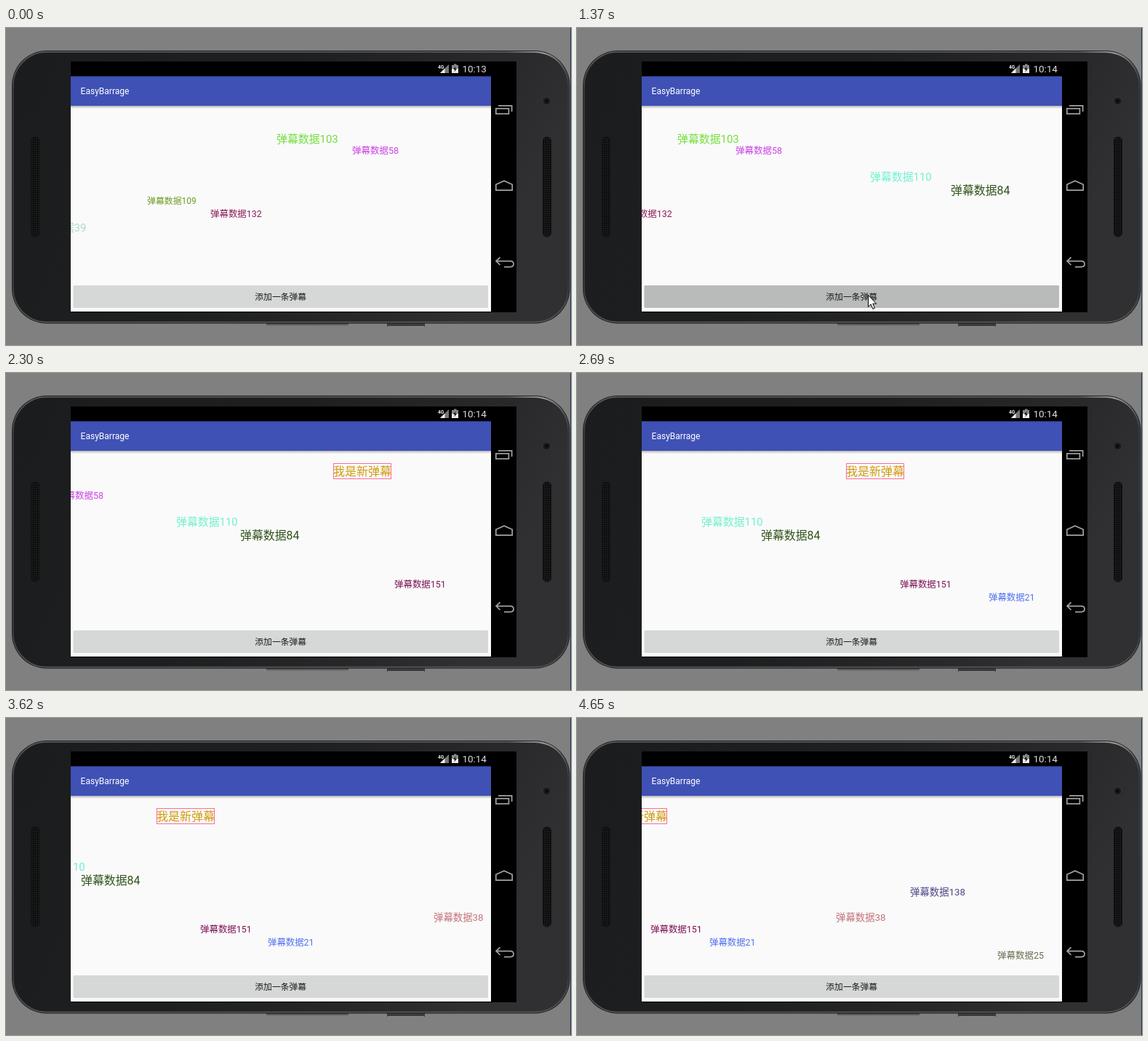
These frames come from a looping animation (777 by 436 pixels, 4750 ms). An HTML page:

```html
<!DOCTYPE html>
<html lang="zh-CN">
<head>
<meta charset="utf-8">
<title>EasyBarrage</title>
<style>
  html, body { margin: 0; width: 100%; height: 100%; overflow: hidden; background: #808080; }
  svg { display: block; width: 777px; height: 436px; }
  text { font-family: Roboto, "Noto Sans CJK SC", "Noto Sans CJK", sans-serif; white-space: pre; }
</style>
</head>
<body>
<svg viewBox="0 0 777 436">
  <defs>
    <linearGradient id="body" x1="0" y1="0" x2="1" y2="0.25">
      <stop offset="0" stop-color="#1b1c1d"/>
      <stop offset="0.5" stop-color="#1e1f20"/>
      <stop offset="0.85" stop-color="#29292b"/>
      <stop offset="1" stop-color="#303032"/>
    </linearGradient>
    <linearGradient id="rim" x1="0" y1="0" x2="0" y2="1">
      <stop offset="0" stop-color="#5e5f60"/>
      <stop offset="0.15" stop-color="#3a3b3c"/>
      <stop offset="0.85" stop-color="#38393a"/>
      <stop offset="1" stop-color="#5a5a5b"/>
    </linearGradient>
    <linearGradient id="gloss" x1="0" y1="0" x2="1" y2="0">
      <stop offset="0" stop-color="#bbb" stop-opacity="0"/>
      <stop offset="0.6" stop-color="#bbb" stop-opacity="0.7"/>
      <stop offset="1" stop-color="#bbb" stop-opacity="0"/>
    </linearGradient>
    <linearGradient id="shade" x1="0" y1="0" x2="0" y2="1">
      <stop offset="0" stop-color="#000" stop-opacity="0.28"/>
      <stop offset="1" stop-color="#000" stop-opacity="0"/>
    </linearGradient>
    <pattern id="mesh" width="3" height="3" patternUnits="userSpaceOnUse">
      <rect width="3" height="3" fill="#1e1f20"/>
      <circle cx="1.5" cy="1.5" r="1.2" fill="#080808"/>
    </pattern>
    <clipPath id="screen"><rect x="89" y="107" width="578" height="247"/></clipPath>
  </defs>

  <rect width="777" height="436" fill="#808080"/>

  <!-- phone -->
  <rect x="358" y="405" width="113" height="5" rx="1" fill="#4a4a4a"/>
  <path d="M358 409H471" stroke="#9a9a9a"/>
  <rect x="524" y="405" width="52" height="6" rx="1" fill="#3c3c3c"/>
  <path d="M525 410.5H575" stroke="#8c8c8c"/>
  <rect x="8" y="31" width="767.5" height="375.5" rx="48" fill="#232425"/>
  <rect x="10" y="33" width="763.5" height="371.5" rx="46" fill="url(#body)" stroke="url(#rim)" stroke-width="1.6"/>
  <path d="M690 33H727Q764 35 772 70" fill="none" stroke="url(#gloss)" stroke-width="2"/>
  <g fill="url(#mesh)" stroke="#111">
    <rect x="34.5" y="150" width="11" height="137" rx="5"/>
    <rect x="738.5" y="150" width="11" height="137" rx="5"/>
  </g>
  <circle cx="743.5" cy="100.5" r="5.5" fill="#1b1b1d" stroke="#39393c"/>
  <circle cx="743.5" cy="100.5" r="2.2" fill="#0a0a0d"/>
  <rect x="776" width="1" height="436" fill="#1f3c5c"/>

  <!-- display -->
  <rect x="89" y="46" width="613" height="345" fill="#000"/>
  <rect x="89" y="67" width="578" height="323" fill="#fafafa"/>
  <rect x="89" y="66.4" width="578" height="40.6" fill="#3f51b5"/>
  <rect x="89" y="107" width="578" height="4" fill="url(#shade)"/>
  <text x="102.6" y="91.3" font-size="12" fill="#fff">EasyBarrage</text>

  <!-- status bar -->
  <path d="M609 50V62H597Z" fill="#777"/>
  <path d="M603.5 55.5V62H597Z" fill="#eee"/>
  <text x="594" y="55.5" font-size="6.6" font-weight="700" fill="#eee">4G</text>
  <path d="M613 51H616V49.5H619.5V51H622V62H613Z" fill="#868686"/>
  <path d="M613 56H622V62H613Z" fill="#eee"/>
  <path d="M618.5 52.5L615 57H617.2L616.5 60.5L620 56H617.8Z" fill="#111"/>
  <text id="clock" x="627.4" y="61.3" font-size="13.4" fill="#dcdcdc"></text>

  <!-- navigation -->
  <g fill="none" stroke="#a2a2a2" stroke-width="1.7">
    <rect x="673.8" y="110.8" width="17.6" height="7.2"/>
    <path d="M677 106.9H695.6V115"/>
    <path d="M673.8 223.2V215.3L685 210.3L696.2 215.3V223.2Z"/>
    <path d="M679.5 315.3L674 320.6L679.5 326M674 320.6H693.5Q698 320.6 698 324.6T693.5 328.6H685"/>
  </g>

  <!-- button -->
  <rect x="92.5" y="354" width="570.5" height="31" rx="1.5" fill="#d6d7d7"/>
  <rect id="press" x="92.5" y="354" width="570.5" height="31" rx="1.5" fill="#b9bbba"/>
  <text x="377.7" y="374.2" font-size="11.8" text-anchor="middle" fill="#1d1d1d">添加一条弹幕</text>

  <g id="lane" clip-path="url(#screen)"></g>
  <path id="cursor" d="M0.5 0.5V16.5L4.2 13L6.8 19.4L9.4 18.3L6.8 12.2H11.6Z" fill="#fff" stroke="#000"/>
</svg>
<script>
const LOOP = 4750;
const TICKS = [0, 150, 270, 390, 550, 670, 820, 980, 1130, 1250, 1370, 1490, 1610,
  1770, 1910, 2060, 2180, 2300, 2450, 2570, 2690, 2810, 2930, 3080, 3200, 3350, 3470,
  3620, 3750, 3900, 4020, 4140, 4260, 4380, 4500, 4650];
const LEFT = 89, SPAN = 578, OMEGA = 2.708e-4;

// label, size, colour, middle y, known x at known time
const items = [
  ['弹幕数据103', 14.9, '#74de3c', 152.5, 371.6, 0],
  ['弹幕数据58', 12.5, '#cc40e6', 168.2, 476, 0],
  ['弹幕数据109', 11.9, '#6b9c22', 237.7, 194, 0],
  ['弹幕数据132', 12.45, '#8c1a58', 256, 280.8, 0],
  ['弹幕数据39', 14.9, '#a9dbc8', 275, 34, 0],
  ['弹幕数据110', 14.9, '#72f0d0', 205, 234, 2300],
  ['弹幕数据84', 15.9, '#30531a', 223, 321.5, 2300],
  ['我是新弹幕', 16, '#d2990f', 135.5, 277, 3200],
  ['弹幕数据151', 12.45, '#7d1254', 291, 342.2, 3200],
  ['弹幕数据21', 12.4, '#5070f0', 308.3, 266, 4140],
  ['弹幕数据38', 13.4, '#c0737a', 274, 356.3, 4650],
  ['弹幕数据138', 13.4, '#4c4784', 239, 457.8, 4650],
  ['弹幕数据25', 12.5, '#6c6c54', 326, 578.3, 4650]
].map(([label, size, color, y, x, t]) => ({
  label, size, color, y, phase: Math.atan((x - LEFT) / SPAN) + OMEGA * t
}));

const $ = id => document.getElementById(id);
const clamp = v => Math.max(0, Math.min(1, v));

function add(parent, tag, attrs) {
  const el = document.createElementNS('http://www.w3.org/2000/svg', tag);
  for (const key in attrs) el.setAttribute(key, attrs[key]);
  return parent.appendChild(el);
}

for (const it of items) {
  it.el = add($('lane'), 'g', {});
  if (it.label.startsWith('我')) {
    add(it.el, 'rect', { x: 0.5, y: 124.5, width: 79, height: 21, fill: 'none', stroke: '#ff6a9c' });
  }
  add(it.el, 'text', {
    x: 0, y: it.y + it.size * 0.36, 'font-size': it.size, fill: it.color
  }).textContent = it.label;
}

function cursorAt(t) {
  if (t < 390 || t >= 2060) return null;
  if (t >= 1910) return [430, 366];
  const k = 1 - clamp((t - 390) / 280);
  return [400 + 6 * k, 367 + 55 * k];
}

function draw(time) {
  const t = TICKS.findLast(tick => tick <= time);
  for (const it of items) {
    const angle = it.phase - OMEGA * t;
    const shown = angle < 0.79 && angle > -0.4;
    it.el.style.display = shown ? '' : 'none';
    if (shown) {
      const x = Math.round(LEFT + SPAN * Math.tan(angle));
      it.el.setAttribute('transform', `translate(${x} 0)`);
    }
  }
  $('clock').textContent = t < 980 ? '10:13' : '10:14';
  $('press').style.opacity = Math.min(clamp((t - 1130) / 240), clamp((1610 - t) / 120));
  const pos = cursorAt(t);
  $('cursor').style.display = pos ? '' : 'none';
  if (pos) $('cursor').setAttribute('transform', `translate(${pos})`);
}

const start = performance.now();
function loop() {
  draw((performance.now() - start) % LOOP);
  requestAnimationFrame(loop);
}
loop();
</script>
</body>
</html>
```
